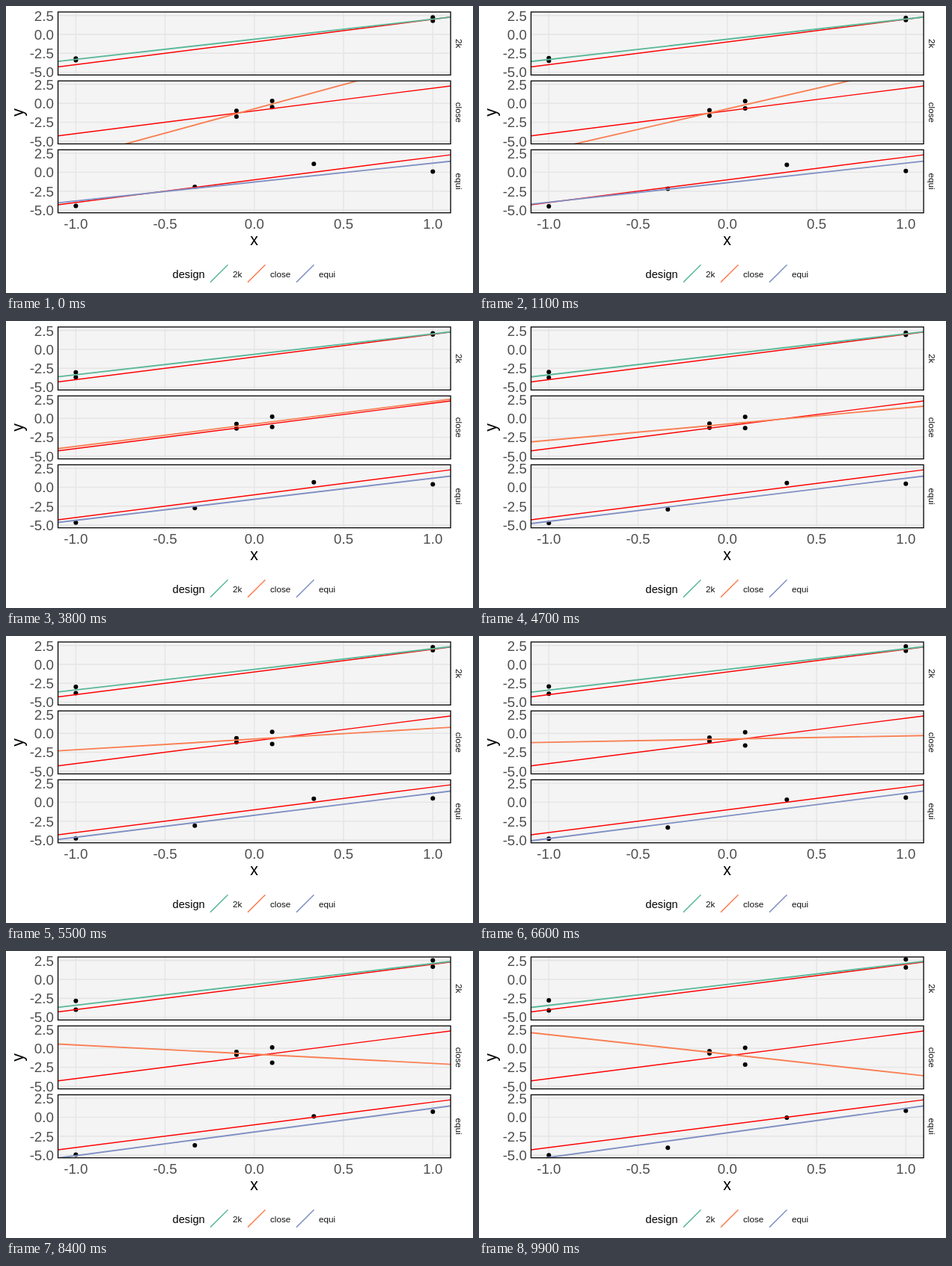
An HTML page that plays this animation: 624 by 384 pixels, repeating every 10000 ms.

```html
<!DOCTYPE html>
<html lang="en">
<head>
<meta charset="utf-8">
<title>Regression designs</title>
<style>
  html, body { margin: 0; width: 100%; height: 100%; overflow: hidden; background: #fff; }
  svg { display: block; width: 624px; height: 384px; font-family: "Liberation Sans", Arial, sans-serif; }
  .grid { stroke: #e5e5e5; stroke-width: 1.4; }
  .truth { stroke: #f00; stroke-width: 1.45; }
  .fit { stroke-width: 1.9; }
  .key { stroke-width: 1.5; }
  .frame { fill: none; stroke: #000; stroke-width: 1.3; }
  .tick { font-size: 18.67px; fill: #4d4d4d; }
  .title { font-size: 21.33px; }
  .legend { font-size: 14.67px; }
  .small { font-size: 11.73px; fill: #111; }
</style>
</head>
<body>
<svg id="stage" viewBox="0 0 624 384"></svg>
<script>
const LEFT = 69.5, WIDTH = 524.6, HEIGHT = 84.3, ZERO = 30;
const STEP = 100, STEPS = 100;
const stage = document.getElementById('stage');

// Each point: x, first y, last y
const panels = [
  { name: '2k', color: '#5ab899', top: 8, keyX: 273,
    points: [[-1, -3.19, -2.77], [-1, -3.41, -4.1], [1, 2.24, 1.58], [1, 1.8, 2.64]] },
  { name: 'close', color: '#f98055', top: 100.2, keyX: 323,
    points: [[-.1, -.99, -.375], [-.1, -1.76, -.67], [.1, .32, .07], [.1, -.5, -2.15]] },
  { name: 'equi', color: '#8090c4', top: 192.4, keyX: 388,
    points: [[-1, -4.45, -5.03], [-1 / 3, -1.94, -4.03], [1 / 3, 1.11, -.06], [1, .09, .85]] }
];

const px = x => 331.8 + 238.5 * x;
const py = y => ZERO - 10.12 * y;

function add(parent, tag, attrs, text) {
  const el = document.createElementNS('http://www.w3.org/2000/svg', tag);
  for (const key in attrs) el.setAttribute(key, attrs[key]);
  if (text) el.textContent = text;
  parent.appendChild(el);
  return el;
}

function line(parent, cls, x1, y1, x2, y2, stroke) {
  const el = add(parent, 'line', { class: cls, x1, y1, x2, y2 });
  if (stroke) el.setAttribute('stroke', stroke);
  return el;
}

function label(cls, x, y, text, anchor = 'start', turn = 0) {
  add(stage, 'text', {
    class: cls, 'text-anchor': anchor,
    transform: `translate(${x} ${y}) rotate(${turn})`
  }, text);
}

const clip = add(add(stage, 'defs'), 'clipPath', { id: 'clip' });
const box = { x: LEFT, y: 0, width: WIDTH, height: HEIGHT };
add(clip, 'rect', box);

const xTicks = [-1, -.5, 0, .5, 1];
const yTicks = [2.5, 0, -2.5, -5];

for (const p of panels) {
  const outer = add(stage, 'g', { transform: `translate(0 ${p.top})` });
  const g = add(outer, 'g', { 'clip-path': 'url(#clip)' });
  add(g, 'rect', { ...box, fill: '#f4f4f4' });
  for (const y of yTicks) {
    line(g, 'grid', LEFT, py(y), LEFT + WIDTH, py(y));
    label('tick', 63.8, p.top + py(y) + 6.8, y.toFixed(1), 'end');
  }
  for (const x of xTicks) line(g, 'grid', px(x), 0, px(x), HEIGHT);
  p.dots = p.points.map(([x]) => add(g, 'circle', { cx: px(x), r: 3 }));
  line(g, 'truth', px(-1.1), py(-4.3), px(1.1), py(2.3));
  p.fit = line(g, 'fit', px(-1.1), 0, px(1.1), 0, p.color);
  add(outer, 'rect', { ...box, class: 'frame' });
  label('small', 600.7, p.top + HEIGHT / 2, p.name, 'middle', 90);
  line(stage, 'key', p.keyX, 369.6, p.keyX + 23.5, 346.2, p.color);
  label('small', p.keyX + 30, 363.2, p.name);
}

for (const x of xTicks) label('tick', px(x), 297.8, x.toFixed(1), 'middle');
label('title', 331.5, 320, 'x', 'middle');
label('title', 22.7, 142.3, 'y', 'middle', -90);
label('legend', 222.5, 364, 'design');

// Least squares; every design is centred on x = 0
function fitLine(points, ys) {
  let sum = 0, sxy = 0, sxx = 0;
  points.forEach(([x], i) => {
    sum += ys[i];
    sxy += x * ys[i];
    sxx += x * x;
  });
  const mean = sum / ys.length, slope = sxy / sxx;
  return x => mean + slope * x;
}

function draw(t) {
  for (const p of panels) {
    const ys = p.points.map(([, from, to]) => from + (to - from) * t);
    ys.forEach((y, i) => p.dots[i].setAttribute('cy', py(y)));
    const fit = fitLine(p.points, ys);
    p.fit.setAttribute('y1', py(fit(-1.1)));
    p.fit.setAttribute('y2', py(fit(1.1)));
  }
}

const start = performance.now();
function tick() {
  const step = Math.floor((performance.now() - start) / STEP) % STEPS;
  draw(step / (STEPS - 1));
  requestAnimationFrame(tick);
}
tick();
</script>
</body>
</html>
```
